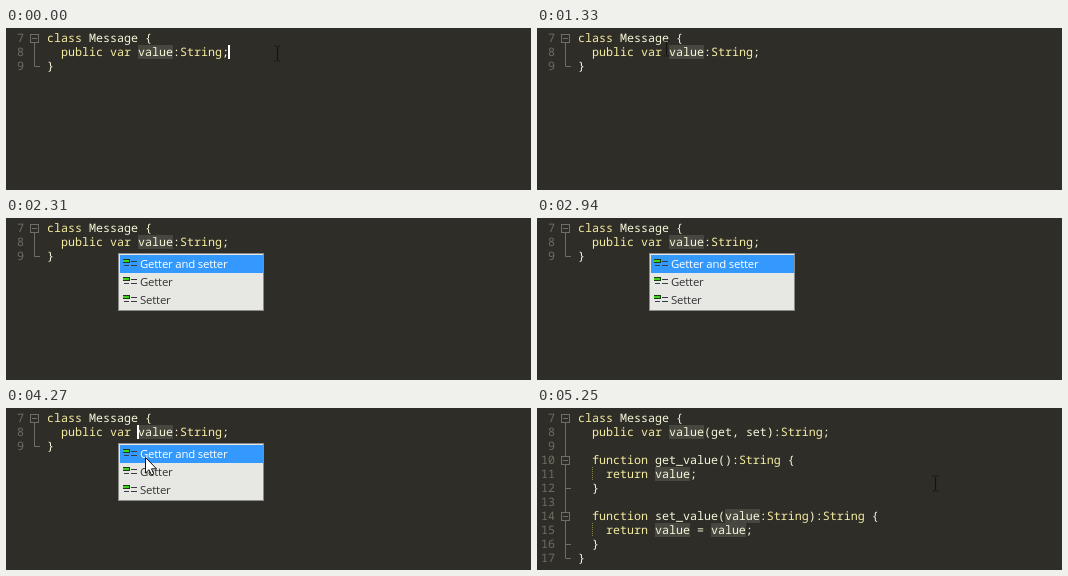
Animation of 525 by 162 pixels, one loop 5.32 s. Source, as an HTML page:

```html
<!DOCTYPE html>
<html lang="en">
<head>
<meta charset="utf-8">
<title>Getter and setter generator</title>
<style>
  html, body { margin: 0; width: 100%; height: 100%; overflow: hidden; background: #2f2d27; }
  svg { display: block; width: 525px; height: 162px; }
  text { white-space: pre; }
  .code { font: 11.667px "Noto Sans Mono", "DejaVu Sans Mono", monospace; fill: #f8f8dc; text-rendering: geometricPrecision; }
  .key { fill: #f7eea4; }
  .num { fill: #716d62; text-anchor: end; }
  .fold { fill: none; stroke: #716d62; }
  .guide { stroke: #8a8148; stroke-dasharray: 1 1; }
  .mark { fill: #47463f; }
  .ui { font: 11.4px "Open Sans", "Noto Sans", sans-serif; letter-spacing: -.2px; fill: #333; }
  .panel { fill: #e7e7e3; stroke: #8b8b8b; }
</style>
</head>
<body>
<svg id="stage" viewBox="0 0 525 162"></svg>
<script>
const LOOP = 5320, CHAR = 7, ROW = 14, LEFT = 41;
const stage = document.getElementById('stage');

function add(parent, tag, attrs = {}, text) {
  const el = document.createElementNS('http://www.w3.org/2000/svg', tag);
  for (const name in attrs) el.setAttribute(name, attrs[name]);
  if (text !== undefined) el.textContent = text;
  parent.append(el);
  return el;
}
const group = (parent = stage) => add(parent, 'g');
const rect = (parent, x, y, width, height, attrs) =>
  add(parent, 'rect', { x, y, width, height, ...attrs });
const path = (parent, d, attrs) => add(parent, 'path', { d, ...attrs });
const rowTop = line => 3 + (line - 7) * ROW;

function drawCode(parent, lines) {
  lines.forEach((source, i) => {
    const y = rowTop(7 + i) + 11;
    add(parent, 'text', { x: 18, y, class: 'code num' }, 7 + i);
    const row = add(parent, 'text', { x: LEFT, y, class: 'code' });
    for (const part of source.split(/\b(class|public|var|function|return|String)\b/)) {
      const key = /^(class|public|var|function|return|String)$/.test(part);
      if (part) add(row, 'tspan', key ? { class: 'key' } : {}, part);
    }
  });
}

function drawFolds(parent, opens, ends) {
  const last = ends[ends.length - 1];
  const mid = line => rowTop(line) + 7.5;
  path(parent, `M28.5 ${mid(7)}V${mid(last)}`, { class: 'fold' });
  for (const line of ends) path(parent, `M28.5 ${mid(line)}H34`, { class: 'fold' });
  for (const line of opens) {
    rect(parent, 24.5, mid(line) - 4, 8, 8, { class: 'fold', style: 'fill:#2f2d27' });
    path(parent, `M26 ${mid(line)}H31`, { class: 'fold' });
  }
}

// Each spot is [line, column].
function drawMarks(parent, spots) {
  for (const [line, col] of spots)
    rect(parent, LEFT + col * CHAR, rowTop(line), 5 * CHAR, ROW, { class: 'mark' });
}

const before = group();
drawMarks(before, [[8, 13]]);
drawFolds(before, [7], [9]);
drawCode(before, ['class Message {', '  public var value:String;', '}']);

const after = group();
const marks = group(after);
drawMarks(marks, [[8, 13], [11, 11], [14, 21], [15, 11], [15, 19]]);
drawFolds(after, [7, 10, 14], [12, 16, 17]);
for (const line of [11, 15])
  path(after, `M55.5 ${rowTop(line)}v${ROW}`, { class: 'guide' });
drawCode(after, [
  'class Message {',
  '  public var value(get, set):String;',
  '',
  '  function get_value():String {',
  '    return value;',
  '  }',
  '',
  '  function set_value(value:String):String {',
  '    return value = value;',
  '  }',
  '}'
]);

const caret = rect(stage, 0, 0, 2, ROW, { fill: '#fff' });

const menu = group();
rect(menu, 112.5, 35.5, 145, 57, { class: 'panel' });
const chosen = rect(menu, 114, 37, 143, 18, { fill: '#39f' });
const labels = ['Getter and setter', 'Getter', 'Setter'].map((label, i) => {
  const y = 41 + 18 * i;
  rect(menu, 117, y, 7, 4, { fill: '#1d3a14' });
  rect(menu, 117, y + 1, 6, 2, { fill: '#3fd41c' });
  path(menu, `M125 ${y + 2.5}h6M118 ${y + 6.5}h5M125 ${y + 6.5}h6`, { stroke: '#343c44' });
  return add(menu, 'text', { x: 134, y: y + 9, class: 'ui' }, label);
});

const tip = group();
rect(tip, 258.5, 36.5, 108, 17, { class: 'panel' });
add(tip, 'text', { x: 262, y: 49, class: 'ui' }, 'Generator template');

const beam = path(stage, 'M-3 -7.5H-1M1 -7.5H3M-3 7.5H-1M1 7.5H3M0 -7V7', { stroke: '#151410', 'stroke-width': 1.2, fill: 'none' });
const arrow = path(stage, 'M.5 .5V16L4 12.7L6.4 18L8.8 17L6.5 11.8H11.5Z', { fill: '#fff', stroke: '#111' });

// Tables of [start time, value]; a value holds until the next entry.
const caretSteps = [
  [0, [222, 8]], [210, null], [700, [222, 8]], [1190, null],
  [1680, [131, 8]], [2100, null], [2450, [131, 8]], [2940, null],
  [3430, [131, 8]], [3780, null], [4130, [131, 8]],
  [4410, [152, 11]], [4900, null]
];
const beamSteps = [
  [0, [271, 25]],
  [840, [241, 25]], [910, [215, 24]], [980, [190, 23]], [1050, [166, 22]],
  [1120, [148, 21]], [1190, [137, 20]], [1260, [131, 20]], [1330, [129, 20]],
  [1400, null], [3640, [129, 20]], [3710, null],
  [4410, [139, 49]], [4760, [145, 47]], [4830, [151, 48]], [4900, [173, 53]],
  [4970, [212, 60]], [5040, [243, 61]], [5110, [267, 62]], [5180, [347, 69]], [5250, [398, 75]]
];
const arrowSteps = [[0, null], [3710, [136, 40]], [3780, [139, 49]], [4410, null]];

const at = (steps, t) => steps.findLast(step => step[0] <= t)[1];
const show = (el, on) => { el.style.display = on ? '' : 'none'; };
const within = (t, from, to) => t >= from && t < to;

function place(el, pos, offset = 0) {
  show(el, pos);
  if (pos) el.setAttribute('transform', `translate(${pos[0] + offset} ${pos[1] + offset})`);
}

function draw(now) {
  const t = now % LOOP;
  show(before, t < 4410);
  show(after, t >= 4410);
  show(marks, t >= 4970);
  show(menu, within(t, 2310, 4410));
  show(tip, within(t, 3010, 4270));
  const picked = !within(t, 4200, 4270);
  show(chosen, picked);
  labels[0].style.fill = picked ? '#fff' : '';

  const spot = at(caretSteps, t);
  place(caret, spot && [spot[0], rowTop(spot[1])]);
  place(beam, at(beamSteps, t), .5);
  place(arrow, at(arrowSteps, t));
}

const start = performance.now();
function tick() {
  draw(performance.now() - start);
  requestAnimationFrame(tick);
}
tick();
</script>
</body>
</html>
```
